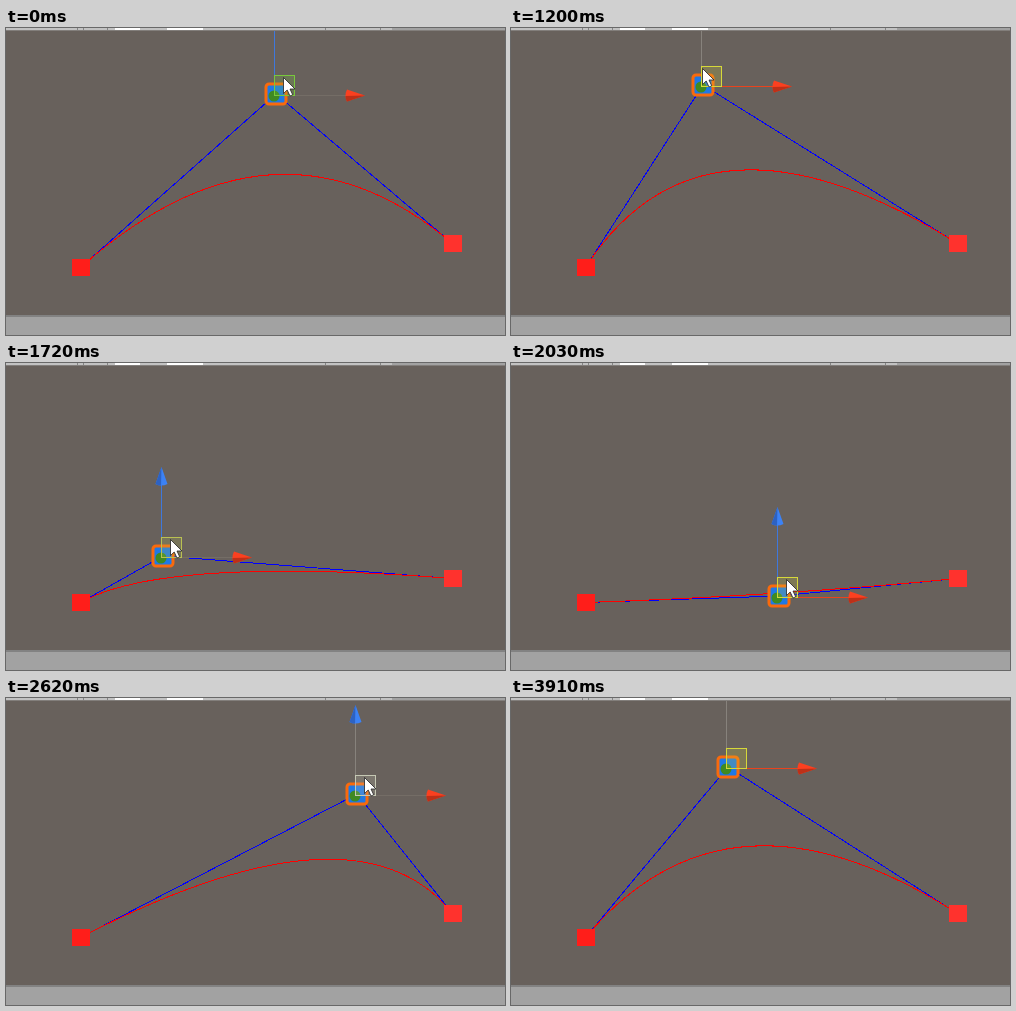
Recreate the animation shown at these times as an HTML page. Size 499 by 307 pixels, loop 5430 ms.

```html
<!DOCTYPE html>
<html lang="en">
<head>
<meta charset="utf-8">
<title>Bezier handle</title>
<style>
  html, body { margin: 0; width: 100%; height: 100%; overflow: hidden; background: #68615c; }
  svg { display: block; width: 499px; height: 307px; shape-rendering: crispEdges; }
  .wire { fill: none; stroke-width: 1; }
  .smooth { shape-rendering: auto; }
</style>
</head>
<body>
<svg viewBox="0 0 499 307">
  <defs><clipPath id="view"><rect y="3" width="499" height="284"/></clipPath></defs>
  <rect width="499" height="307" fill="#68615c"/>

  <g clip-path="url(#view)">
    <path id="arms" class="wire" stroke="#0000ff"/>
    <path id="curve" class="wire" stroke="#ff0000"/>
    <rect x="66" y="231" width="18" height="17" fill="#ff1e1a"/>
    <rect x="438" y="207" width="18" height="17" fill="#ff322d"/>

    <g id="gizmo">
      <g class="smooth">
        <rect x="-8" y="-11" width="20" height="20" rx="3" fill="#1f78e6" stroke="#f96a0c" stroke-width="3"/>
        <circle cx="0" cy="1" r="5.5" fill="#3f8a22"/>
      </g>
      <path id="upAxis" class="wire" d="M.5 0V-73"/>
      <path id="sideAxis" class="wire" d="M15 .5H73"/>
      <g class="smooth">
        <path d="M.5-90L6.5-73Q.5-70-5.5-73Z" fill="#3c82f5"/>
        <path d="M.5-90L-5.5-73Q-3-71.5 0-71.5Z" fill="#2d62c2"/>
        <path d="M91 .5L73-5.5Q70 .5 73 6.5Z" fill="#fb4020"/>
        <path d="M91 .5L73 6.5Q71.5 4 71.5 1Z" fill="#bd3018"/>
      </g>
      <rect id="plane" x=".5" y="-19.5" width="20" height="20" fill-opacity=".2"/>
    </g>
    <path id="cursor" class="smooth" d="M.5.5V16.5L4.2 13L7 19L9.7 17.8L7 12H12Z"
          fill="#fff" stroke="#222" stroke-width=".8"/>
  </g>

  <rect width="499" height="2" fill="#c2c2c2"/>
  <rect x="386" width="113" height="2" fill="#a2a2a2"/>
  <path d="M109 1H134M161 1H197" stroke="#fff" stroke-width="2"/>
  <path d="M71.5 0V2M77.5 0V2M101.5 0V2M319.5 0V2M374.5 0V2" stroke="#858585"/>
  <rect y="2" width="499" height="1" fill="#827e7b"/>
  <rect y="287" width="499" height="20" fill="#a2a2a2"/>
  <rect y="287" width="499" height="2" fill="#828282"/>
</svg>

<script>
const LOOP = 5430;
const el = id => document.getElementById(id);
const set = (id, attrs) => {
  for (const name in attrs) el(id).setAttribute(name, attrs[name]);
};

// Dragging is sampled in bursts: first time, last time, number of steps.
const bursts = [[870, 1400, 14], [1460, 1970, 9], [2030, 2530, 9], [2620, 3150, 9], [3220, 3500, 5]];

// Time, handle x, handle y, cursor x offset.
const path = [
  [820, 268, 67, 9], [1020, 235, 58, 5], [1200, 189, 58, 1], [1400, 150, 92, 7],
  [1560, 141, 143, 9], [1720, 156, 195, 9], [1870, 206, 230, 9], [1970, 246, 237, 9],
  [2030, 266, 234, 9], [2180, 306, 214, 9], [2350, 341, 168, 9], [2530, 354, 109, 9],
  [2620, 349, 97, 9], [2800, 325, 81, 9], [3000, 290, 73, 9], [3150, 265, 72, 9],
  [3500, 215, 70, 9]
];

// Time, vertical axis, horizontal axis, plane handle.
const GREY = "#87827c", DIM = "#746d66", BLUE = "#3f78dc", RED = "#e9431d", YELLOW = "#d6d83a";
const tints = [
  [0, BLUE, DIM, "#78c83c"], [660, GREY, RED, YELLOW], [1460, BLUE, DIM, "#b9c052"],
  [2030, BLUE, RED, YELLOW], [2620, GREY, DIM, "#c5c8b4"], [2680, GREY, RED, YELLOW]
];

function sampleTime(t) {
  const burst = bursts.filter(b => b[0] <= t).pop();
  if (!burst) return 0;
  const [from, to, count] = burst;
  const step = (to - from) / (count - 1);
  return Math.min(to, from + Math.floor((t - from) / step + 1e-6) * step);
}

function pose(t) {
  const last = path.length - 1;
  if (t <= path[0][0]) return path[0].slice(1);
  if (t >= path[last][0]) return path[last].slice(1);
  const i = path.findIndex(p => p[0] > t) - 1;
  const a = path[i], b = path[i + 1];
  const before = path[Math.max(0, i - 1)], after = path[Math.min(last, i + 2)];
  const span = b[0] - a[0], u = (t - a[0]) / span;
  return [1, 2, 3].map(k => {
    const m = (b[k] - before[k]) / (b[0] - before[0]) * span;
    const n = (after[k] - a[k]) / (after[0] - a[0]) * span;
    return a[k] + u * (m + u * (3 * (b[k] - a[k]) - 2 * m - n + u * (m + n - 2 * (b[k] - a[k]))));
  }).map(Math.round);
}

function draw(t) {
  const [x, y, lead] = pose(sampleTime(t));
  const [, up, side, plane] = tints.filter(s => s[0] <= t).pop();
  const knot = `${x + 2} ${y - 1}`;
  set("arms", { d: `M74.5 239.5L${knot}L446.5 215.5` });
  set("curve", { d: `M74.5 239.5Q${knot} 446.5 215.5` });
  set("gizmo", { transform: `translate(${x} ${y})` });
  set("upAxis", { stroke: up });
  set("sideAxis", { stroke: side });
  set("plane", { stroke: plane, fill: plane });

  const leave = t >= 3835 ? 2 : t >= 3760 ? 1 : 0;
  set("cursor", {
    transform: `translate(${x + lead + leave * 11.5} ${y - 18 + leave * 1.5})`,
    visibility: t < 3910 ? "visible" : "hidden"
  });
}

const start = performance.now();
function tick() {
  draw((performance.now() - start) % LOOP);
  requestAnimationFrame(tick);
}
tick();
</script>
</body>
</html>
```
